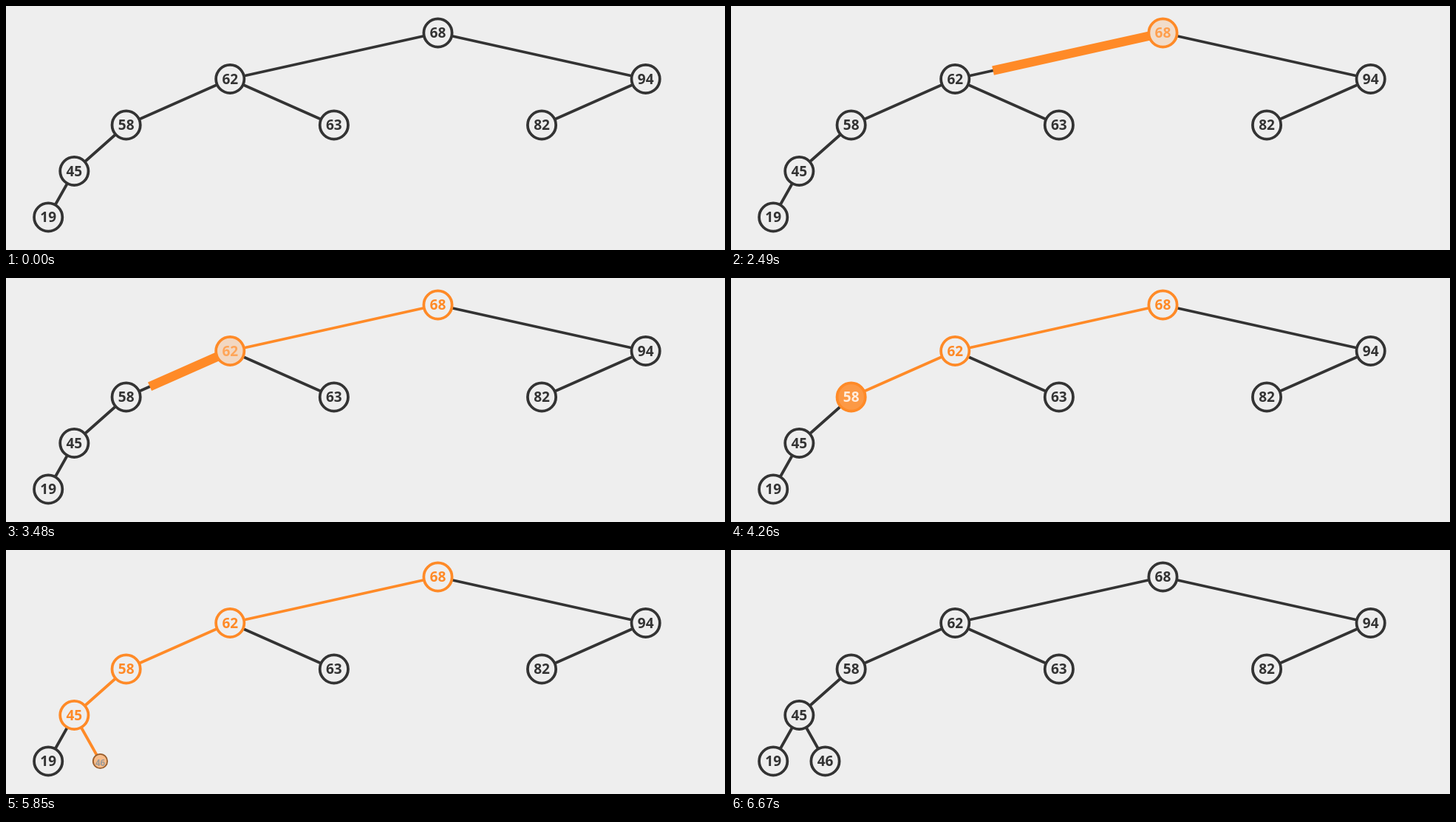
Write an HTML page with a canvas that moves like this. It is 973 by 331 pixels and loops after 7540 ms.

```html
<!DOCTYPE html>
<html lang="en">
<head>
<meta charset="utf-8">
<title>Binary search tree: insert 46</title>
<style>
  html, body { margin: 0; width: 100%; height: 100%; overflow: hidden; background: #eee; }
  canvas { display: block; }
</style>
</head>
<body>
<canvas id="stage" width="973" height="331"></canvas>
<script>
const ctx = document.getElementById('stage').getContext('2d');
const LOOP = 7540, STEP = 490, R = 21, LINE = 3.75, THICK = 12.5;

// Start of each step: visit, follow edge, visit, ... insert, reset
const starts = [1745, 2149, 2655, 3156, 3640, 4126, 4620, 5112, 5605, 6099];
const INSERT = 8, RESET = 9;

const DARK = [51, 51, 51], PALE = [238, 238, 238], WHITE = [255, 255, 255], ORANGE = [255, 138, 39];
const normal = { ring: DARK, fill: PALE, text: DARK };
const active = { ring: ORANGE, fill: ORANGE, text: WHITE };
const visited = { ring: ORANGE, fill: PALE, text: ORANGE };

// value: [column, level, parent]; columns count from the left in 35 px units
const tree = {
  68: [15, 0], 62: [7, 1, 68], 94: [23, 1, 68], 58: [3, 2, 62], 63: [11, 2, 62],
  82: [19, 2, 94], 45: [1, 3, 58], 19: [0, 4, 45], 46: [2, 4, 45]
};
const path = [68, 62, 58, 45, 46];

const place = v => [57.2 + tree[v][0] * 35.15, 36.5 + tree[v][1] * 62.5];
const lerp = (a, b, p) => a + (b - a) * p;
const mix = (a, b, p) => a.map((c, i) => lerp(c, b[i], p));
const rgb = c => `rgb(${c.map(Math.round)})`;

// Eased progress of a step, quadratic in and out
function progress(step, t) {
  const x = Math.min(1, Math.max(0, (t - starts[step]) / STEP));
  return x < .5 ? 2 * x * x : 1 - 2 * (1 - x) ** 2;
}

function line(a, b, part, width, color) {
  ctx.beginPath();
  ctx.moveTo(...a);
  ctx.lineTo(...mix(a, b, part));
  ctx.lineWidth = width;
  ctx.strokeStyle = rgb(color);
  ctx.stroke();
}

function drawEdge(v, t) {
  const a = place(tree[v][2]), b = place(v), i = path.indexOf(v);
  const grown = i > 0 ? progress(2 * i - 1, t) : 0;
  const isNew = v === 46;
  if (grown < 1 && !isNew) line(a, b, 1, LINE, DARK);
  if (grown > 0) {
    const width = isNew ? LINE : lerp(THICK, LINE, progress(2 * i, t));
    line(a, b, grown, width, mix(ORANGE, DARK, progress(RESET, t)));
  }
}

function look(v, t) {
  const i = path.indexOf(v), style = { ...normal };
  if (i < 0) return style;
  const blend = (to, p) => {
    for (const key in style) style[key] = mix(style[key], to[key], p);
  };
  blend(active, progress(2 * i, t));
  if (2 * i < INSERT) blend(visited, progress(2 * i + 1, t));
  blend(normal, progress(RESET, t));
  return style;
}

function drawNode(v, t) {
  const size = v === 46 ? progress(INSERT, t) : 1;
  if (!size) return;
  const [x, y] = place(v), style = look(v, t);
  ctx.beginPath();
  ctx.arc(x, y, (R - LINE / 2) * size, 0, 2 * Math.PI);
  ctx.fillStyle = rgb(style.fill);
  ctx.fill();
  ctx.lineWidth = LINE * size;
  ctx.strokeStyle = rgb(style.ring);
  ctx.stroke();
  ctx.font = `700 ${lerp(4, 19, size)}px "Open Sans", "Noto Sans", sans-serif`;
  ctx.fillStyle = rgb(style.text);
  ctx.fillText(v, x, y + 6.8);
}

function draw(now) {
  const t = now % LOOP, values = Object.keys(tree).map(Number);
  ctx.fillStyle = rgb(PALE);
  ctx.fillRect(0, 0, 973, 331);
  ctx.textAlign = 'center';
  for (const v of values) if (tree[v][2]) drawEdge(v, t);
  for (const v of values) drawNode(v, t);
  requestAnimationFrame(() => draw(performance.now() - begin));
}

const begin = performance.now();
draw(0);
</script>
</body>
</html>
```
